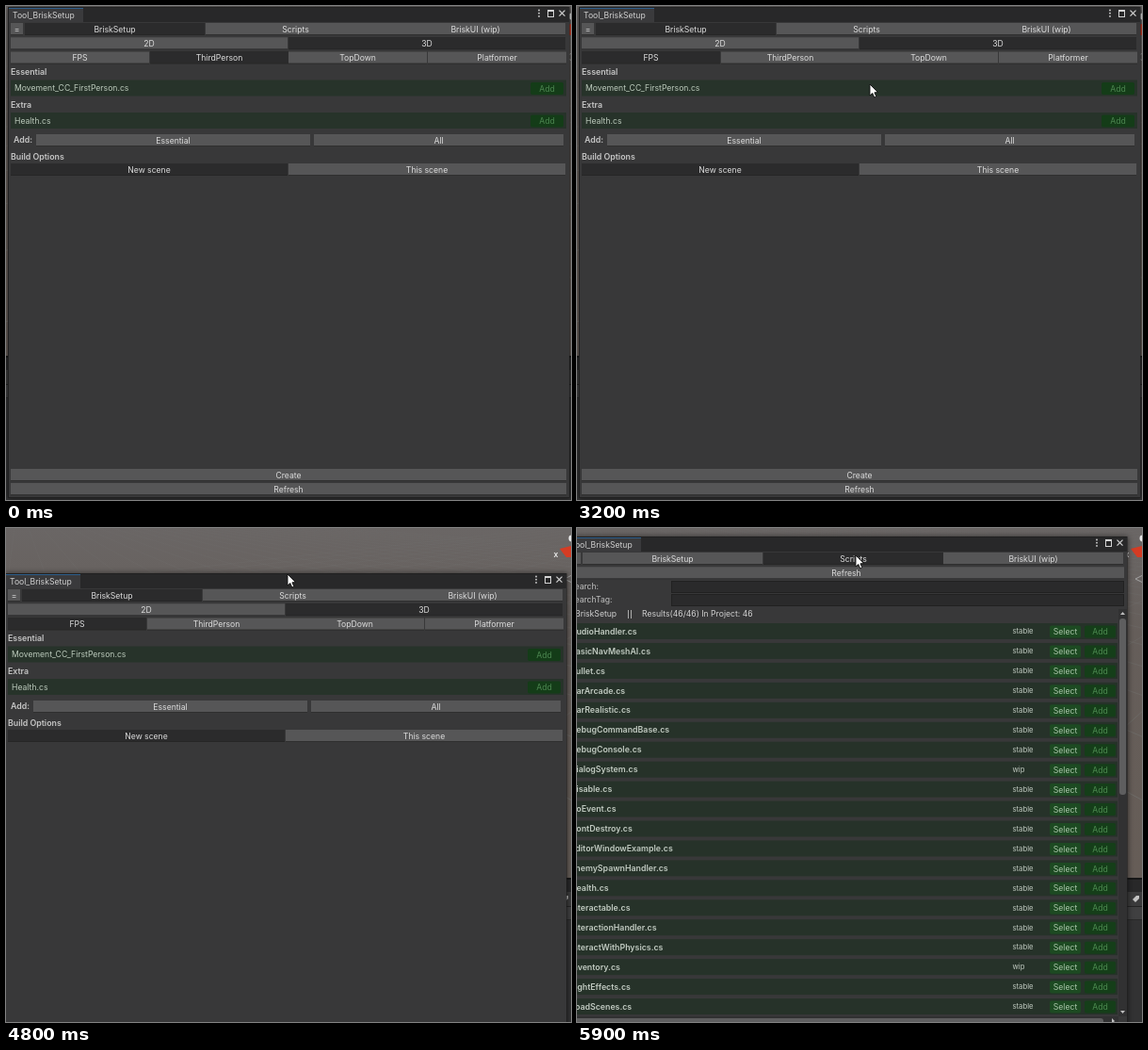
Recreate the animation shown at these times as an HTML page with a canvas. Size 600 px wide and 524 px high, loop 6 s.

```html
<!DOCTYPE html>
<html lang="en">
<head>
<meta charset="utf-8">
<title>Editor tool window</title>
<style>
  html, body { margin: 0; width: 100%; height: 100%; overflow: hidden; background: #333; }
  canvas { display: block; width: 600px; height: 524px; }
</style>
</head>
<body>
<canvas id="stage" width="600" height="524"></canvas>
<script>
const W = 600, H = 524, LOOP = 6000, STEP = 100;
const LEFT = 5, RIGHT = 595, BAR = 13, PITCH = 15.2, TOP = 18;
const HORIZON = -30, FLOOR = 371;
const ctx = document.getElementById('stage').getContext('2d');
const FONT = 'Inter, "Open Sans", sans-serif';
const TOOL = 'BriskSetup';

const FPS_AT = 800, PRESS_AT = 2300, RELEASE_AT = 2400, SCRIPTS_AT = 5800;
const GRAB_AT = 3500, DROP_AT = 5300, LAG = 100;

// Stops of the pointer: [time, x, y], eased in between
const stops = [
  [0, 225, -30], [300, 200, 56], [700, 84, 55], [1400, 84, 55],
  [2000, 341, 496], [2600, 341, 496], [3400, 306, 7], [GRAB_AT, 306, 7],
  [3600, 750, 70], [4070, 768, 98], [4730, 300, 54], [5030, 292, 15],
  [DROP_AT, 292, 15], [5600, 296, 29]
];

const scripts = ('AudioHandler BasicNavMeshAI Bullet CarArcade CarRealistic DebugCommandBase ' +
  'DebugConsole DialogSystem Disable DoEvent DontDestroy EditorWindowExample ' +
  'EnemySpawnHandler Health Interactable InteractionHandler InteractWithPhysics ' +
  'Inventory LightEffects LoadScenes').split(' ');
const unfinished = ['DialogSystem', 'Inventory'];

let mouse = { x: 0, y: 0 };

const clamp = (v, lo, hi) => Math.min(hi, Math.max(lo, v));
const ease = p => p * p * (3 - 2 * p);

function pointerAt(t) {
  const last = stops[stops.length - 1];
  const i = stops.findIndex(s => s[0] > t);
  const [t0, x0, y0] = i < 0 ? last : stops[i - 1];
  const [t1, x1, y1] = i < 0 ? last : stops[i];
  const p = i < 0 ? 0 : ease((t - t0) / (t1 - t0));
  return { x: Math.round(x0 + (x1 - x0) * p), y: Math.round(y0 + (y1 - y0) * p) };
}

// The window trails the pointer from grab to drop
function windowAt(t) {
  const grip = pointerAt(GRAB_AT);
  const hand = pointerAt(clamp(t - LAG, GRAB_AT, DROP_AT));
  return { x: hand.x - grip.x, y: hand.y - grip.y };
}

function box(x, y, w, h, color) {
  ctx.fillStyle = color;
  ctx.fillRect(x, y, w, h);
}

function round(x, y, w, h, r, color) {
  ctx.fillStyle = color;
  ctx.beginPath();
  ctx.roundRect(x, y, w, h, r);
  ctx.fill();
}

function shape(points, fill, stroke) {
  ctx.beginPath();
  points.forEach(([x, y]) => ctx.lineTo(x, y));
  ctx.closePath();
  if (fill) { ctx.fillStyle = fill; ctx.fill(); }
  if (stroke) { ctx.strokeStyle = stroke; ctx.lineWidth = 0.9; ctx.stroke(); }
}

function line(x0, y0, x1, y1, color, width = 1) {
  ctx.strokeStyle = color;
  ctx.lineWidth = width;
  ctx.beginPath();
  ctx.moveTo(x0, y0);
  ctx.lineTo(x1, y1);
  ctx.stroke();
}

function disc(x, y, rx, ry, color) {
  ctx.fillStyle = color;
  ctx.beginPath();
  ctx.ellipse(x, y, rx, ry, 0, 0, 7);
  ctx.fill();
}

function ring(x, y, r, color) {
  ctx.strokeStyle = color;
  ctx.lineWidth = 1;
  ctx.beginPath();
  ctx.arc(x, y, r, 0, 7);
  ctx.stroke();
}

// y is the middle of the capital letters
function text(str, x, y, { color = '#d0d0d0', size = 8.65, weight = 400, align = 'left' } = {}) {
  ctx.font = `${weight} ${size}px ${FONT}`;
  ctx.textAlign = align;
  ctx.fillStyle = color;
  ctx.fillText(str, x, y + size * 0.36);
}

const heading = (str, x, y, color = '#c6c6c6') => text(str, x, y, { weight: 600, size: 8.8, color });

function button(label, x, y, w, { on = false, down = false } = {}) {
  const over = mouse.x >= x && mouse.x < x + w && mouse.y >= y && mouse.y < y + BAR;
  box(x, y, w, BAR, '#252525');
  box(x, y, w, BAR - 0.8, on ? '#2b2b2c' : down ? '#3b3b3b' : over ? '#646464' : '#565657');
  text(label, x + w / 2, y + BAR / 2, { align: 'center', color: '#dcdcdc' });
}

function tabs(labels, x, y, selected) {
  const w = (RIGHT - x) / labels.length;
  labels.forEach((label, i) =>
    button(label, Math.round(x + i * w), y, Math.round(w) - 1, { on: i === selected }));
}

function pill(label, x, y, w, fill, color) {
  round(x, y - 6, w, BAR, 2, fill);
  text(label, x + w / 2, y + 0.5, { align: 'center', color });
}

function drawGrid() {
  const fade = ctx.createLinearGradient(0, 0, 0, FLOOR);
  fade.addColorStop(0, 'rgba(125,132,132,0.05)');
  fade.addColorStop(1, 'rgba(125,136,134,0.55)');
  for (let i = -12; i < 24; i++) {
    line(13, HORIZON, 158 + i * 198, FLOOR, fade, 0.8);
    line(850, HORIZON, 160 + i * 244, FLOOR, fade, 0.8);
  }
}

function drawPlatform() {
  const west = [265, 114], north = [368, 86], east = [486, 121], south = [377, 178];
  const drop = ([x, y]) => [x, y + 6];
  shape([west, south, drop(south), drop(west)], '#9ba8b2');
  shape([south, east, drop(east), drop(south)], '#bcc6ce');
  shape([west, north, east, south], '#fdfdfd');
  disc(379, 121, 5.5, 1.5, '#73777a');
  round(370, 105, 6, 11, 3, '#6e7276');
  ring(373, 103.5, 2.4, '#555');
}

function drawGizmo() {
  const red = '#d43c24', pale = '#e8e8e8';
  disc(601, 11, 3.5, 3.5, pale);
  shape([[588, 22], [600, 19], [600, 31], [595, 31]], red);
  text('x', 584, 27.5, { weight: 600, align: 'center', color: pale });
  shape([[593, 54], [601, 50], [601, 58]], null, '#aaa');
}

function drawScene() {
  const sky = ctx.createLinearGradient(0, 0, 0, FLOOR);
  sky.addColorStop(0, '#6a6665');
  sky.addColorStop(0.3, '#655e5a');
  sky.addColorStop(1, '#665d57');
  box(0, 0, W, H, sky);
  drawGrid();
  drawPlatform();
  drawGizmo();

  // Each band covers the rest of the panel below it
  let y = FLOOR;
  for (const [h, color] of [[2, '#171717'], [13, '#282829'], [15, '#3b3b3c'],
    [1, '#242424'], [13, '#404041'], [1, '#292929'], [H, '#323233']]) {
    box(0, y, W, H, color);
    y += h;
  }
  box(348, 388, 228, 11, '#29292a');
  ring(353.5, 393, 1.8, '#bbb');
  line(355, 394.5, 357, 396.5, '#bbb');
  shape([[590, 394], [594, 390], [597, 390], [597, 393], [593, 397]], '#c4c4c4');
}

function drawFrame() {
  const icon = '#d4d4d4';
  ctx.save();
  ctx.shadowColor = 'rgba(0,0,0,0.55)';
  ctx.shadowBlur = 6;
  box(2, 1, 596.5, 521, '#202020');
  ctx.restore();
  box(3, 2, 595, 15, '#282829');
  box(3, 17, 595, 504, '#383839');
  box(3, 2, 79, 15, '#3a3a3c');
  box(3, 2, 79, 1, '#2f5f8c');
  text('Tool_' + TOOL, 7, 10);
  for (let i = -1; i < 2; i++) disc(566, 7.7 + i * 3.2, 0.9, 0.9, icon);
  box(575, 4, 7, 8, icon);
  box(576, 6, 5, 5, '#282829');
  for (const s of [-3, 3]) line(590.5 - s, 4.7, 590.5 + s, 10.7, icon, 1.2);
}

function scriptRow(name, y) {
  box(LEFT, y - 8.5, RIGHT - LEFT, 17, '#27332a');
  text(name, 9, y, { color: '#bccabc' });
  pill('Add', 557, y, 35, '#143c18', '#4c8650');
}

function drawSetup(t) {
  tabs(['2D', '3D'], LEFT, TOP + PITCH, 1);
  tabs(['FPS', 'ThirdPerson', 'TopDown', 'Platformer'], LEFT, TOP + 2 * PITCH, t < FPS_AT ? 1 : 0);
  heading('Essential', LEFT, 70);
  scriptRow('Movement_CC_FirstPerson.cs', 87);
  heading('Extra', LEFT, 104.5);
  scriptRow('Health.cs', 121.5);
  heading('Add:', 8, 141.5);
  button('Essential', 32, 136, 291);
  button('All', 327, 136, 265);
  heading('Build Options', LEFT, 160);
  tabs(['New scene', 'This scene'], LEFT, 167, 0);
  button('Create', LEFT, 491, RIGHT - LEFT, { down: t >= PRESS_AT && t < RELEASE_AT });
  button('Refresh', LEFT, 506, RIGHT - LEFT);
}

function drawSearch() {
  ['Search:', 'SearchTag:'].forEach((label, i) => {
    const y = 54 + i * 14;
    text(label, 6, y, { color: '#c0c0c0' });
    box(114, y - 6, RIGHT - 114, BAR, '#212121');
    box(115, y - 5, RIGHT - 116, BAR - 2, '#2a2a2b');
  });
  text(TOOL, 12, 83);
  for (const x of [68.5, 71.5]) line(x, 79, x, 88, '#aaa');
  text('Results(46/46) In Project: 46', 83, 83);
}

function drawList() {
  ctx.save();
  ctx.beginPath();
  ctx.rect(3, 90, 586, 419);
  ctx.clip();
  scripts.forEach((name, i) => {
    const y = 101.5 + i * 20.95;
    box(3, y - 8.5, 585, 17, '#263229');
    heading(name + '.cs', 7, y, '#c2cbc2');
    text(unfinished.includes(name) ? 'wip' : 'stable', 476.5, y, { size: 7.7, color: '#c0cac0' });
    pill('Select', 516, y, 33, '#1d4a22', '#aac6aa');
    pill('Add', 553, y, 33, '#153e19', '#4c8a50');
  });
  ctx.restore();
}

function drawScrollbars() {
  const track = '#313132', thumb = '#5e5e5f', arrow = '#c0c0c0';
  box(589, 78, 9, 432, track);
  box(3, 510, 586, 11, track);
  round(590, 88, 7, 187, 3, thumb);
  round(12, 512, 561, 6, 3, thumb);
  shape([[591, 84], [596, 84], [593.5, 81]], arrow);
  shape([[591, 504], [596, 504], [593.5, 507]], arrow);
  shape([[582, 512], [582, 518], [585, 515]], arrow);
}

function drawWindow(t) {
  const listing = t >= SCRIPTS_AT;
  drawFrame();
  button('=', LEFT, TOP, 13);
  tabs([TOOL, 'Scripts', 'BriskUI (wip)'], 20, TOP, listing ? 1 : 0);
  if (!listing) return drawSetup(t);
  button('Refresh', LEFT, TOP + PITCH, RIGHT - LEFT);
  drawSearch();
  drawList();
  drawScrollbars();
}

function drawPointer({ x, y }) {
  ctx.save();
  ctx.translate(x, y);
  shape([[0, 0], [0, 12], [2.8, 9.5], [4.8, 14], [6.8, 13], [4.9, 8.8], [8.6, 8.6]], '#fff', '#111');
  ctx.restore();
}

function draw(t) {
  const pos = windowAt(t), tip = pointerAt(t);
  mouse = { x: tip.x - pos.x, y: tip.y - pos.y };
  drawScene();
  ctx.save();
  ctx.translate(pos.x, pos.y);
  drawWindow(t);
  ctx.restore();
  drawPointer(tip);
}

const start = performance.now();
function tick() {
  const t = (performance.now() - start) % LOOP;
  draw(Math.floor(t / STEP) * STEP);
  requestAnimationFrame(tick);
}
tick();
</script>
</body>
</html>
```
